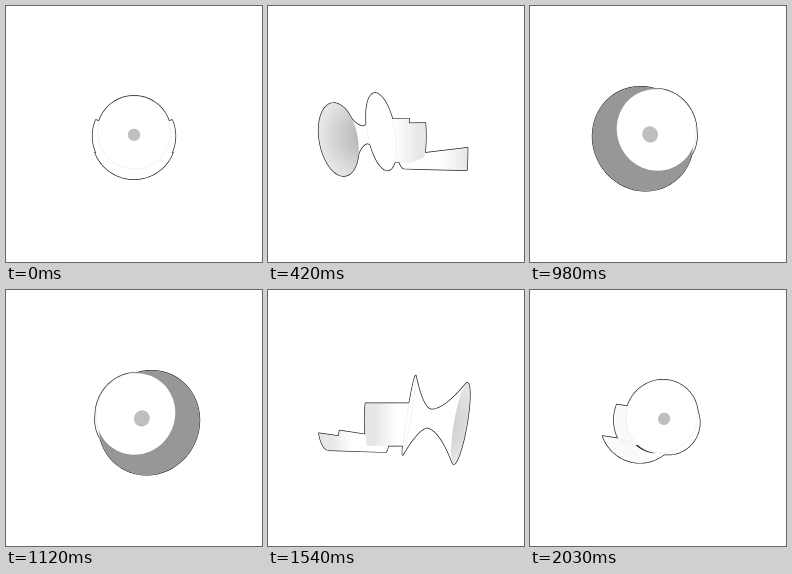
An HTML page with a canvas that plays this animation: 256x256 px, repeating every 2.1 s.

```html
<!DOCTYPE html>
<html>
<head>
<meta charset="utf-8">
<style>
html, body { margin: 0; width: 100%; height: 100%; overflow: hidden; background: #fff; }
canvas { display: block; width: 100vmin; height: 100vmin; }
</style>
</head>
<body>
<canvas id="stage" width="256" height="256"></canvas>
<script>
const ctx = document.getElementById("stage").getContext("2d");
const LOOP = 2100, STEP = 70, EYE = 240, TILT = 0.165;
const BELL = 62, NECK = 33, DISC = 13.5;
let sin = 0, cos = 1;

const grey = a => `rgba(0,0,0,${a})`;
const clamp = v => Math.max(0, Math.min(1, v));
const mix = (a, b, u) => a + (b - a) * u;

// s runs along the horn, w across it, y points down
function project([s, w, y]) {
  const k = EYE / (EYE + s * cos + w * sin);
  return [128 + (w * cos - s * sin) * k, 130 + y * k];
}

function circle(s, r) {
  return Array.from({ length: 65 }, (_, i) => {
    const a = i * Math.PI / 32, v = r * Math.sin(a);
    return [s - TILT * v, r * Math.cos(a), TILT * s - 6.8 + v];
  });
}

// Open arc, lying like a gutter, with its rims at height rim
function gutter(s, r, cy, rim, floor, lean = 0) {
  const a = Math.asin((rim - cy) / r);
  return Array.from({ length: 41 }, (_, i) => {
    const b = mix(a, Math.PI - a, i / 40);
    const y = Math.min(floor, cy + r * Math.sin(b));
    return [s - lean * y, r * Math.cos(b), y];
  });
}

function flareRadius(s) {
  const u = (s - NECK) / (s > NECK ? BELL - NECK : DISC - NECK);
  return 9 + 30 * u ** 1.7;
}

const flare = Array.from({ length: 33 }, (_, i) => {
  const s = mix(DISC, BELL, i / 32);
  return circle(s, flareRadius(s));
});
const body = [gutter(DISC - 1, 36, 0, -14.5, 23, TILT), gutter(-23, 37.5, 0, -14.5, 23)];
const handle = [gutter(-10, 31, 1, 20, 40), gutter(-68, 30, 1, 12, 40)];
const bell = circle(BELL, 39), disc = circle(DISC, 38.4), hole = circle(NECK, 7);

function addPolygon(path, pts) {
  let area = 0;
  pts.forEach(([x, y], i) => {
    const [nx, ny] = pts[(i + 1) % pts.length];
    area += x * ny - nx * y;
  });
  // Same winding everywhere, so overlaps never cancel out
  if (area < 0) pts.reverse();
  pts.forEach(([x, y], i) => i ? path.lineTo(x, y) : path.moveTo(x, y));
  path.closePath();
}

function addSkin(path, rings) {
  const flat = rings.map(ring => ring.map(project));
  for (let i = 1; i < flat.length; i++) {
    for (let j = 1; j < flat[i].length; j++) {
      addPolygon(path, [flat[i - 1][j - 1], flat[i - 1][j], flat[i][j], flat[i][j - 1]]);
    }
  }
}

function outline(pts) {
  const path = new Path2D();
  addPolygon(path, pts.map(project));
  return path;
}

function drawShell(rings, end, fade) {
  const path = new Path2D();
  addSkin(path, rings);
  const shade = ctx.createLinearGradient(...project([end, 0, 0]), ...project([end + fade, 0, 0]));
  shade.addColorStop(0, grey(0.1 * Math.abs(sin)));
  shade.addColorStop(1, grey(0));
  ctx.fillStyle = shade;
  ctx.fill(path);
}

function drawBell() {
  const facing = -cos;
  const light = clamp((1 + facing) * 1.5 - 0.05);
  const base = light * (0.1 + 0.32 * Math.max(0, facing) ** 2);
  const extra = light * 0.22 * clamp((0.5 - facing) * 2);
  const [x, y] = project([NECK, 0, 0]);
  const shade = ctx.createRadialGradient(x, y, 0, x, y, 46);
  shade.addColorStop(0, grey(base + extra));
  shade.addColorStop(1, grey(base));
  ctx.fillStyle = shade;
  ctx.fill(outline(bell));
}

function draw(angle) {
  sin = Math.sin(angle);
  cos = Math.cos(angle);
  ctx.fillStyle = "#fff";
  ctx.fillRect(0, 0, 256, 256);
  ctx.lineJoin = "round";

  const whole = new Path2D();
  [flare, body, handle].forEach(rings => addSkin(whole, rings));
  [bell, disc].forEach(ring => addPolygon(whole, ring.map(project)));
  ctx.lineWidth = 1.4;
  ctx.strokeStyle = "#222";
  ctx.stroke(whole);
  ctx.fill(whole);

  ctx.save();
  ctx.clip(whole);
  drawShell(handle, -68, 24);
  drawShell(body, -23, 24);
  drawBell();
  const plate = outline(disc);
  ctx.fillStyle = "#fff";
  ctx.fill(plate);
  ctx.lineWidth = 0.6;
  ctx.strokeStyle = grey(0.1);
  ctx.stroke(plate);
  ctx.fillStyle = grey(0.25 * clamp((Math.abs(cos) - 0.85) * 10));
  ctx.fill(outline(hole));
  ctx.restore();
}

function tick() {
  const t = performance.now() % LOOP;
  draw(Math.floor(t / STEP) * STEP / LOOP * 2 * Math.PI);
  requestAnimationFrame(tick);
}
tick();
</script>
</body>
</html>
```
